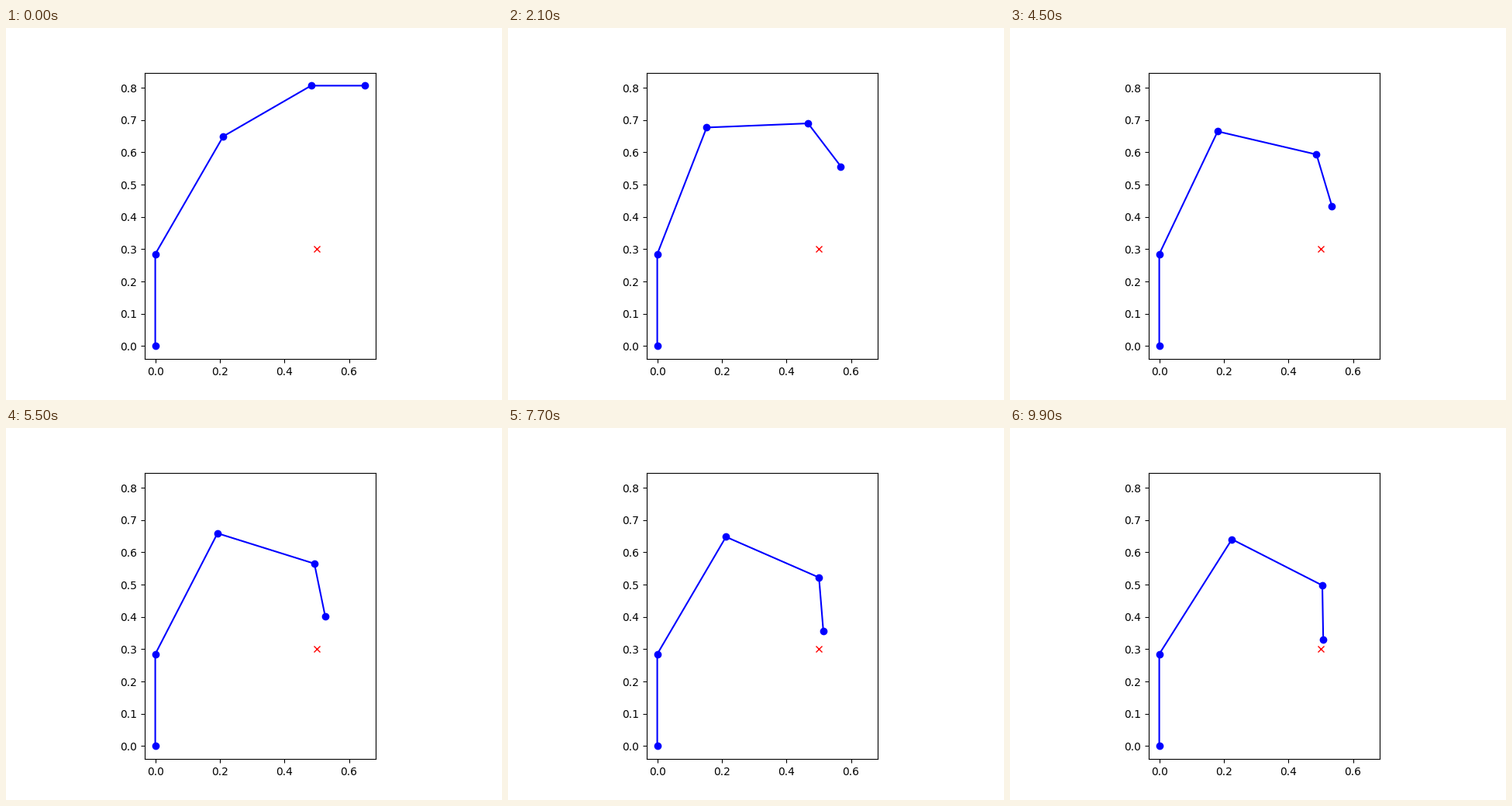
Write a matplotlib script that moves like this. It is 640x480 px and loops after 10 s.

```python
import numpy as np
import matplotlib.pyplot as plt
from matplotlib.animation import FuncAnimation

FRAMES = 100
LINKS = np.array([0.2848, 0.4208, 0.3143, 0.1674])
TARGET = np.array([0.5, 0.3])
FIRST_GAIN, GAIN = 0.12, 0.0271


def joints(q):
    """Joint positions; angles run clockwise from vertical, the base link is fixed."""
    a = np.concatenate([[0], np.cumsum(q)])
    steps = LINKS[:, None] * np.column_stack([np.sin(a), np.cos(a)])
    return np.vstack([[0, 0], np.cumsum(steps, axis=0)])


def jacobian(pts):
    r = pts[-1] - pts[1:4]
    return np.array([r[:, 1], -r[:, 0]])


def solve():
    """Resolved-rate motion towards the target, with a longer first step."""
    q = np.radians([30.0, 30.0, 30.0])
    poses = [joints(q)]
    for i in range(1, FRAMES):
        pts = poses[-1]
        gain = FIRST_GAIN if i == 1 else GAIN
        q = q + gain * np.linalg.pinv(jacobian(pts)) @ (TARGET - pts[-1])
        poses.append(joints(q))
    return poses


poses = solve()

fig, ax = plt.subplots(figsize=(6.4, 4.8), dpi=100)
ax.set_aspect("equal")
arm, = ax.plot(*poses[0].T, "bo-")
ax.plot(*TARGET, "rx")
ax.set_xlim(ax.get_xlim())
ax.set_ylim(ax.get_ylim())


def update(i):
    arm.set_data(*poses[i].T)
    return arm,


anim = FuncAnimation(fig, update, frames=FRAMES, interval=100,
                     repeat=True, repeat_delay=0)
plt.show()
```
